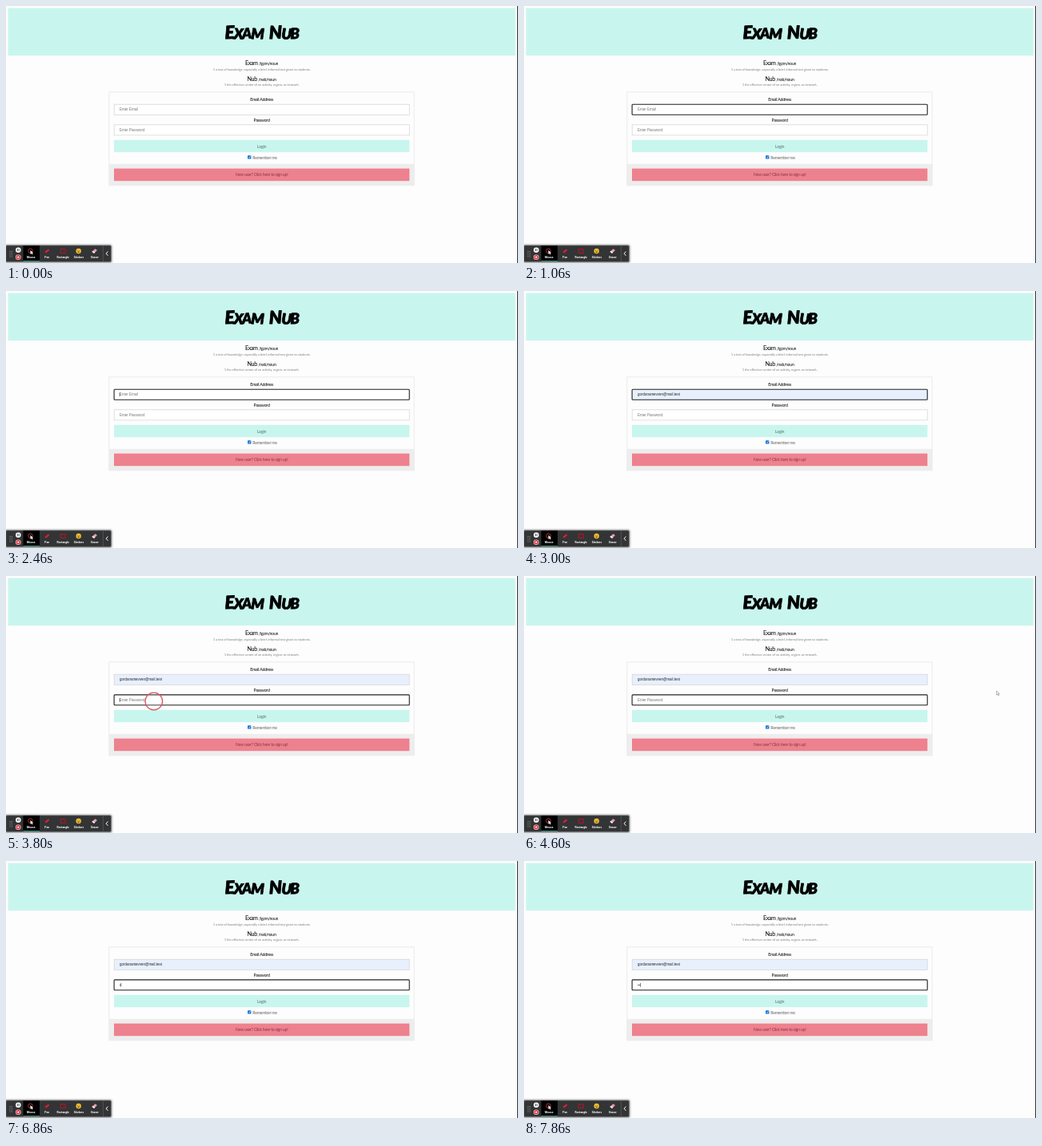
Recreate the animation shown at these times as an HTML page. Size 640 by 322 pixels, loop 8000 ms.

```html
<!DOCTYPE html>
<html lang="en">
<head>
<meta charset="utf-8">
<title>Exam Nub</title>
<style>
html, body { margin: 0; width: 100%; height: 100%; overflow: hidden; background: #fdfdfd; }
svg { display: block; width: 640px; height: 322px; }
text { font-family: Lato, sans-serif; }
.mid { text-anchor: middle; }
.title { font-weight: 900; font-style: italic; font-size: 18.5px; letter-spacing: -1.3px; word-spacing: 5px;
  stroke: #000; stroke-width: .7; stroke-linejoin: round; }
.title .cap { font-size: 22.5px; }
.word { font-size: 7.2px; letter-spacing: -.4px; }
.word .say { font-size: 5.1px; letter-spacing: -.2px; }
.note { font-size: 4.2px; letter-spacing: -.12px; fill: #828282; }
.label { font-size: 5.3px; letter-spacing: -.28px; }
.field { font-family: "Liberation Sans", Arial, sans-serif; font-size: 4.45px; fill: #757575; }
.typed { fill: #222; }
.box { stroke: #d2d2d2; stroke-width: .7; fill: #fff; }
.tool { font: bold 3.4px Roboto, sans-serif; fill: #fff; text-anchor: middle; }
</style>
</head>
<body>
<svg viewBox="0 0 640 322">
  <defs>
    <filter id="soft" x="-5%" y="-30%" width="110%" height="160%"><feGaussianBlur stdDeviation="1"/></filter>
  </defs>

  <rect x="2.6" y="2.6" width="634" height="59.5" fill="#c8f6ee"/>
  <rect x="639" width="1" height="322" fill="#353638"/>
  <text class="title mid" x="319.8" y="41.2" rotate="-2 2 -3 1 0 -2 3 -2"><tspan class="cap">E</tspan>XAM <tspan class="cap">N</tspan>UB</text>

  <text class="word mid" x="319.6" y="74">Exam <tspan class="say">/igzm/noun</tspan></text>
  <text class="note mid" x="319.6" y="80.5">1 a test of knowledge, especially a brief, informal test given to students.</text>
  <text class="word mid" x="319.6" y="93.6">Nub <tspan class="say">/nəb/noun</tspan></text>
  <text class="note mid" x="319.6" y="100">1 the effective center of an activity, region, or network.</text>

  <rect x="128.8" y="107.8" width="381.4" height="117" fill="#fdfdfd" stroke="#ececec"/>
  <rect x="128.5" y="197.8" width="382" height="27.4" fill="#ededed"/>

  <text class="label mid" x="319.6" y="119">Email Address</text>
  <rect id="emailBox" class="box" x="135.2" y="123.2" width="369" height="13.1"/>
  <text id="email" class="field" x="142.1" y="131.4"></text>

  <text class="label mid" x="319.6" y="144.6">Password</text>
  <rect class="box" x="135.2" y="148.8" width="369" height="13.1"/>
  <text id="pass" class="field" x="142.1" y="157"></text>
  <g id="dots" fill="#333"><circle cx="142.8" cy="155.4" r=".6"/><circle cx="144.2" cy="155.4" r=".6"/></g>

  <rect id="focus" x="135.1" width="369.1" height="12.9" rx="1" fill="none" stroke="#2a2a2a" stroke-width="1.1"/>
  <rect id="caret" width=".6" height="4.8" fill="#222"/>

  <rect x="135" y="167.8" width="369.3" height="15.4" fill="#c8f6ee"/>
  <text class="label mid" x="319.6" y="177.6" fill="#587670">Login</text>
  <rect x="302" y="187.2" width="4.4" height="4.4" rx=".7" fill="#0b6fd8"/>
  <path d="M303 189.4l1 1 1.5-2.2" fill="none" stroke="#fff" stroke-width=".7"/>
  <text class="label" x="308.3" y="191.5" fill="#666">Remember me</text>
  <rect x="135" y="203.6" width="369.3" height="15.6" fill="#ee818e"/>
  <text class="label mid" x="319.6" y="213.3" fill="#8a3947">New user? Click here to sign up!</text>

  <g id="bar">
    <rect x="-2" y="299" width="134.5" height="23" rx="2" fill="#000" opacity=".4" filter="url(#soft)"/>
    <rect x="0" y="300" width="131.4" height="20.6" rx="1.5" fill="#333435" stroke="#777" stroke-width=".6"/>
    <rect x="21.5" y="300.3" width="20.5" height="19.6" fill="#000"/>
    <rect x="21.5" y="319" width="20.5" height="1" fill="#3d8f80"/>
    <path d="M5 307v8M7.3 307v8" stroke="#999" stroke-width="1" stroke-dasharray="1 1.2"/>
    <circle cx="15.3" cy="305.7" r="3.3" fill="#fff"/>
    <path d="M14.4 304.2v3M16.2 304.2v3" stroke="#333" stroke-width=".8"/>
    <circle cx="15.3" cy="314.7" r="3.3" fill="#f3dede"/>
    <circle cx="15.3" cy="314.7" r="2.6" fill="#d92f3d"/>
    <rect x="14.3" y="313.7" width="2" height="2" fill="#fff"/>
    <circle cx="30.5" cy="306.8" r="2.8" fill="none" stroke="#d8404c" stroke-width=".8"/>
    <path d="M30.4 306l.2 5 1.2-1 1 1.6.8-.5-.9-1.5 1.5-.3z" fill="#fff"/>
    <path d="M48.7 309.6l.7-2.3 3.5-2.7 1.4 1.5-3.4 2.8z" fill="#e01f33"/>
    <rect x="68.2" y="304.8" width="6" height="4.6" fill="none" stroke="#b81428" stroke-width="1"/>
    <circle cx="90.7" cy="307" r="3.2" fill="#f6c534"/>
    <path d="M88.8 307.8q1.9 2.6 3.8 0z" fill="#6d4214"/>
    <circle cx="89.6" cy="306" r=".5" fill="#6d4214"/><circle cx="91.8" cy="306" r=".5" fill="#6d4214"/>
    <path d="M107.4 308l4-3.8 2.6 1.7-3.9 4z" fill="#f09aa8"/>
    <path d="M107.4 308l1.3-1.2 2.7 1.8-1.3 1.3z" fill="#e8e8ee"/>
    <text class="tool" x="31.3" y="315.7">Mouse</text>
    <text class="tool" x="51.3" y="315.7">Pen</text>
    <text class="tool" x="71.2" y="315.7">Rectangle</text>
    <text class="tool" x="91" y="315.7">Stickers</text>
    <text class="tool" x="111" y="315.7">Eraser</text>
    <path d="M121.3 300.3v20" stroke="#686868" stroke-width=".6"/>
    <path d="M127.4 307.6l-2.3 2.6 2.3 2.6" fill="none" stroke="#fff" stroke-width="1"/>
  </g>

  <circle id="ring" cx="184.8" cy="157" r="10.8" fill="#fff" fill-opacity=".15" stroke="#d95365" stroke-width="1.3"/>
  <path id="arrow" d="M0 0v5l1.2-1 .9 1.8.9-.4-.9-1.7 1.6-.2z" fill="#fff" stroke="#666" stroke-width=".5"/>
</svg>
<script>
const LOOP = 8000, BLINK = 533;
const at = {
  emailFocus: 201, fill: 2530, passFocus: 3797, ringOn: 3730, ringOff: 3930,
  moveStart: 4130, moveEnd: 4400, key1: 6463, key2: 7660
};
const $ = id => document.getElementById(id);
const show = (el, on) => el.setAttribute("visibility", on ? "visible" : "hidden");
const ease = p => p * p * (3 - 2 * p);

const email = $("email"), pass = $("pass"), dots = $("dots").children;
const focus = $("focus"), caret = $("caret"), ring = $("ring"), arrow = $("arrow");

function setText(el, text, typed) {
  if (el.textContent !== text) el.textContent = text;
  el.classList.toggle("typed", typed);
}

function drawCaret(t) {
  const onPass = t >= at.passFocus;
  const start = t >= at.key2 ? at.key2 : t >= at.key1 ? at.key1 : onPass ? at.passFocus : at.emailFocus;
  const idle = t < at.emailFocus || (t >= at.fill && !onPass);
  const typed = (t >= at.key1) + (t >= at.key2);
  caret.setAttribute("x", 141.8 + typed * 1.7);
  caret.setAttribute("y", onPass ? 152.9 : 127.3);
  show(caret, !idle && Math.floor((t - start) / BLINK) % 2 === 0);
}

function drawPointer(t) {
  const p = ease(Math.min(1, Math.max(0, (t - at.moveStart) / (at.moveEnd - at.moveStart))));
  const x = 185 + 405.7 * p, y = 157 - 13 * p;
  arrow.setAttribute("transform", `translate(${x} ${y})`);
  show(arrow, x > 505 && t < at.key1);
  show(ring, t >= at.ringOn && t < at.ringOff);
}

function draw(t) {
  const filled = t >= at.fill;
  setText(email, filled ? "gordanamevven@mail.test" : "Enter Email", filled);
  $("emailBox").style.fill = filled ? "#e8f0fe" : "#fff";
  setText(pass, t < at.key1 ? "Enter Password" : "", false);
  show(dots[0], t >= at.key1);
  show(dots[1], t >= at.key2);
  focus.setAttribute("y", t < at.passFocus ? 123.3 : 148.9);
  show(focus, t >= at.emailFocus);
  drawCaret(t);
  drawPointer(t);
}

const begin = performance.now();
function tick() {
  draw((performance.now() - begin) % LOOP);
  requestAnimationFrame(tick);
}
tick();
</script>
</body>
</html>
```
